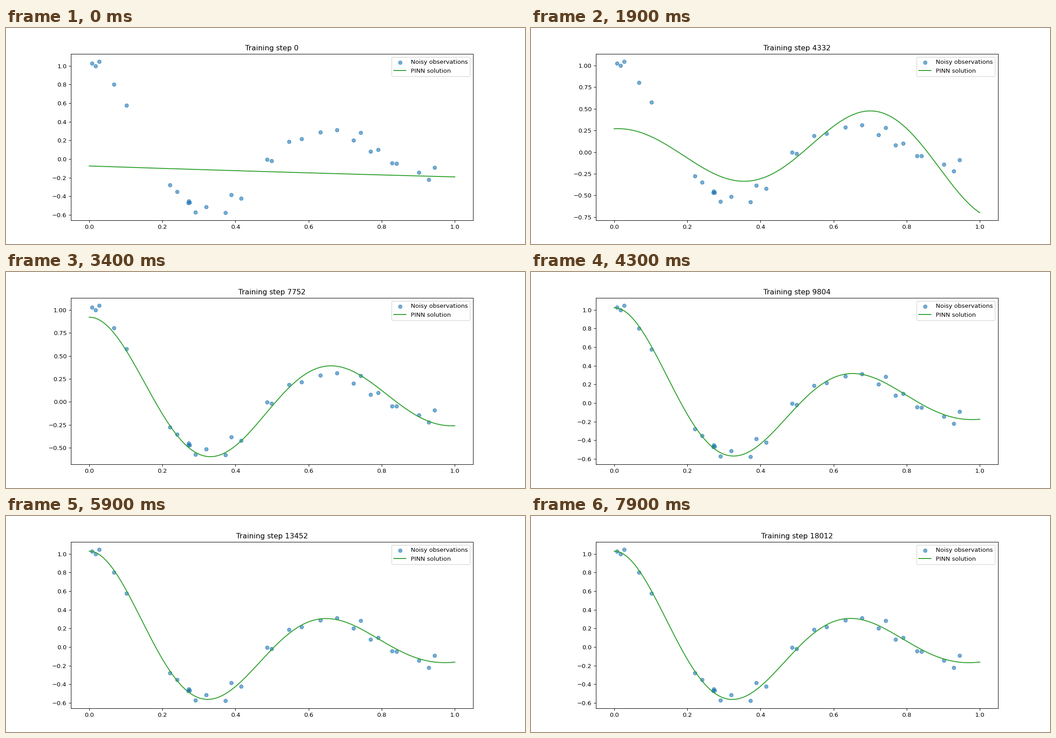
These frames come from a looping animation (1159 by 483 pixels, 8 s). A matplotlib script:

```python
import numpy as np
import matplotlib.pyplot as plt
from matplotlib.animation import FuncAnimation

W, H = 1159, 483
DPI = W / 12
FRAMES, INTERVAL, STEPS = 80, 100, 228
WARMUP = 8

# Measured points (x, y).
OBS = np.array([
    (.008, 1.026), (.018, .999), (.027, 1.048), (.068, .803), (.102, .576),
    (.221, -.278), (.240, -.351), (.271, -.470), (.272, -.450), (.275, -.468),
    (.290, -.570), (.320, -.514), (.373, -.576), (.388, -.384), (.415, -.421),
    (.486, -.003), (.499, -.017), (.546, .187), (.581, .215), (.632, .288),
    (.677, .311), (.723, .201), (.742, .284), (.769, .080), (.790, .099),
    (.828, -.045), (.841, -.046), (.902, -.142), (.929, -.221), (.945, -.092)])

X = np.linspace(0, 1, 400)


def oscillation(amp, decay, swell, freq, shift):
    """Wave in the envelope exp(-decay s + swell s^2), peaking at s = 0."""
    s = X - shift
    rate = decay - 2 * swell * s
    envelope = amp * np.exp(-decay * s + swell * s ** 2)
    return envelope * (np.cos(freq * s) + rate / freq * np.sin(freq * s))


def solution(n):
    """Network output: a straight start gives way to the damped oscillator."""
    grow = min(n / WARMUP, 1)
    t = max(n, WARMUP)
    amp = 0.035 + 0.995 * (1 - np.exp(-(t / 27.3) ** 3.6))
    swell = 2.7 * np.exp((WARMUP - t) / 6.83)
    decay = 1.87 + 0.8 * swell - 2.84 * np.exp(-((t - 16.4) / 14) ** 2)
    lag = 1 / (1 + ((t - 19) / 11) ** 2)
    wave = oscillation(amp, decay, swell, 9.74 - 0.64 * lag, 0.01 * lag ** 2)
    start = -0.0744 - 0.132 * X + 0.0147 * X ** 2
    return grow ** 2 * wave + (1 - grow) ** 2 * start


# The small excess keeps the pixel size from rounding down.
fig, ax = plt.subplots(figsize=((W + 1e-3) / DPI, (H + 1e-3) / DPI), dpi=DPI)
ax.scatter(*OBS.T, color="tab:blue", alpha=0.6, label="Noisy observations")
line, = ax.plot(X, solution(0), color="tab:green", label="PINN solution")
ax.legend(loc="upper right")
ax.set_xlim(-0.05, 1.05)


def update(n):
    u = solution(n)
    line.set_ydata(u)
    low = min(u.min(), OBS[:, 1].min())
    high = max(u.max(), OBS[:, 1].max())
    pad = 0.05 * (high - low)
    ax.set_ylim(low - pad, high + pad)
    ax.set_title(f"Training step {n * STEPS}")
    return line,


anim = FuncAnimation(fig, update, frames=FRAMES, interval=INTERVAL,
                     init_func=lambda: update(0), repeat=True)
plt.show()
```
